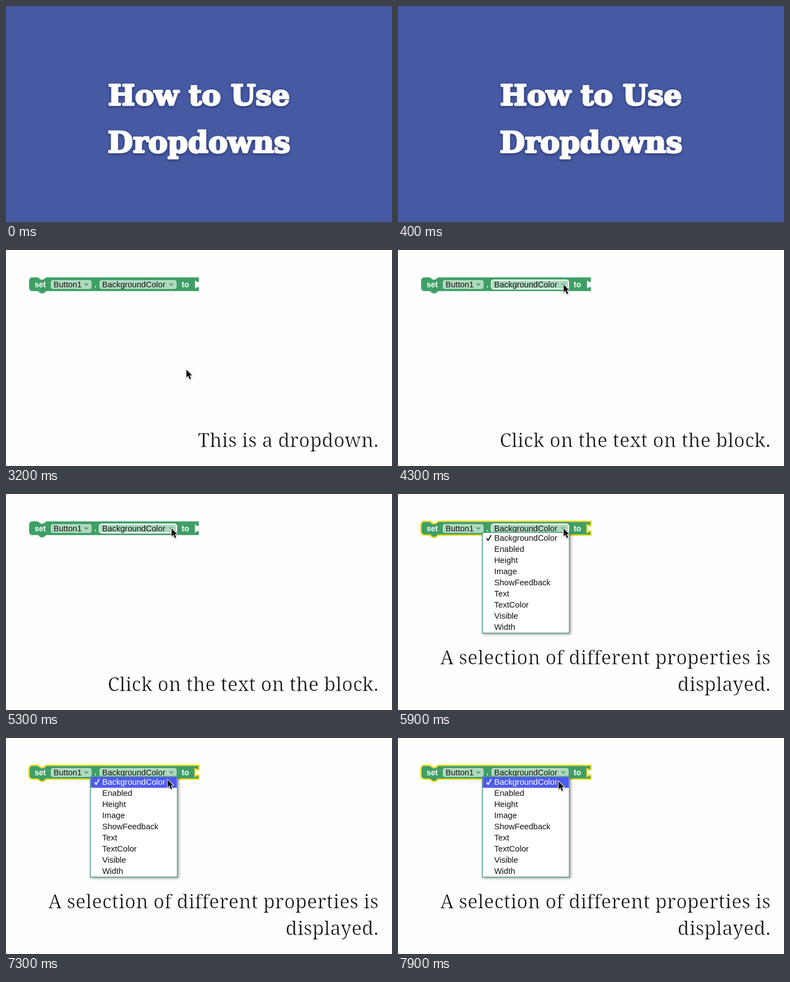
Animation of 690 by 388 pixels, one loop 8000 ms. Source, as an HTML page with a canvas:

```html
<!DOCTYPE html>
<html lang="en">
<head>
<meta charset="utf-8">
<title>How to Use Dropdowns</title>
<style>
  html, body { margin: 0; width: 100%; height: 100%; overflow: hidden; background: #fefefe; }
  canvas { display: block; width: 690px; height: 388px; }
</style>
</head>
<body>
<canvas id="stage" width="690" height="388"></canvas>
<script>
const ctx = document.getElementById('stage').getContext('2d');
const LOOP = 8000;
const SANS = '"Liberation Sans", Arial, sans-serif';
const ITEMS = ['BackgroundColor', 'Enabled', 'Height', 'Image', 'ShowFeedback',
               'Text', 'TextColor', 'Visible', 'Width'];

// Pointer tip: [time, x, y]
const POINTER = [
  [1800, 366, 194], [2500, 322.5, 215], [3400, 322.5, 215], [3800, 301, 115],
  [3900, 301, 115], [4200, 296, 62], [7050, 296, 62], [7400, 287, 78]
];

const CAPTIONS = [
  [5800, ['A selection of different properties is', 'displayed.']],
  [4000, ['Click on the text on the block.']],
  [1800, ['This is a dropdown.']]
];

const ease = u => u * u * (3 - 2 * u);

function pointerAt(t) {
  const next = POINTER.findIndex(k => k[0] > t);
  if (next < 0) return POINTER[POINTER.length - 1].slice(1);
  const [t0, x0, y0] = POINTER[next - 1], [t1, x1, y1] = POINTER[next];
  const u = ease((t - t0) / (t1 - t0));
  return [x0 + (x1 - x0) * u, y0 + (y1 - y0) * u];
}

function text(str, x, y, font, color, align = 'left') {
  ctx.font = font;
  ctx.fillStyle = color;
  ctx.textAlign = align;
  ctx.fillText(str, x, y);
}

function polygon(points) {
  ctx.beginPath();
  points.forEach(([x, y]) => ctx.lineTo(x, y));
  ctx.closePath();
}

function drawTitleLine(line, y, size) {
  ctx.save();
  ctx.shadowColor = 'rgba(10, 15, 50, 0.5)';
  ctx.shadowBlur = 4;
  ctx.shadowOffsetY = 2;
  // A round outline softens and thickens the slabs.
  ctx.strokeStyle = '#fff';
  ctx.lineJoin = 'round';
  ctx.lineWidth = 3;
  ctx.textAlign = 'center';
  ctx.font = `bold ${size}px "DejaVu Serif", serif`;
  ctx.strokeText(line, 345, y);
  ctx.shadowColor = 'transparent';
  text(line, 345, y, ctx.font, '#fff', 'center');
  ctx.restore();
}

function drawTitle() {
  ctx.fillStyle = '#4659a3';
  ctx.fillRect(0, 0, 690, 388);
  drawTitleLine('How to Use', 177.5, 51);
  drawTitleLine('Dropdowns', 262.5, 52);
}

function drawCaption(lines) {
  ctx.save();
  ctx.letterSpacing = '0.25px';
  lines.forEach((line, i) => {
    const y = 354 - 48 * (lines.length - 1 - i);
    text(line, 666, y, '300 34px "Noto Serif", serif', '#111', 'right');
    // A hairline in the page colour slims the strokes.
    ctx.strokeStyle = '#fefefe';
    ctx.lineWidth = 0.7;
    ctx.strokeText(line, 666, y);
  });
  ctx.restore();
}

function blockPath() {
  ctx.beginPath();
  ctx.moveTo(48, 49);
  ctx.lineTo(57, 49);
  ctx.lineTo(62, 53);
  ctx.lineTo(67, 53);
  ctx.lineTo(72, 49);
  ctx.lineTo(345, 49);
  ctx.lineTo(345, 56);
  ctx.lineTo(343, 58);
  ctx.lineTo(338, 55);
  ctx.lineTo(338, 69);
  ctx.lineTo(343, 66);
  ctx.lineTo(345, 68);
  ctx.lineTo(345, 74);
  ctx.lineTo(72, 74);
  ctx.lineTo(67, 78);
  ctx.lineTo(62, 78);
  ctx.lineTo(57, 74);
  ctx.lineTo(48, 74);
  ctx.quadraticCurveTo(41, 74, 41, 67);
  ctx.lineTo(41, 56);
  ctx.quadraticCurveTo(41, 49, 48, 49);
  ctx.closePath();
}

function drawField(label, x, width, hovered) {
  ctx.beginPath();
  ctx.roundRect(x, 54, width, 16, 4);
  ctx.fillStyle = '#afd9bf';
  ctx.fill();
  if (hovered) {
    ctx.strokeStyle = '#f4fbf6';
    ctx.lineWidth = 2;
    ctx.stroke();
  }
  text(label, x + 5, 66.5, '14.6px ' + SANS, '#111');
  const right = x + width;
  polygon([[right - 14, 60], [right - 5, 60], [right - 9.5, 65]]);
  ctx.fillStyle = '#64a882';
  ctx.fill();
}

function drawBlock(selected, hovered) {
  ctx.lineJoin = 'round';
  blockPath();
  ctx.fillStyle = '#3f9f66';
  ctx.fill();
  ctx.save();
  ctx.clip();
  ctx.strokeStyle = '#6ab488';
  ctx.lineWidth = 2;
  ctx.stroke();
  ctx.restore();
  if (selected) {
    ctx.strokeStyle = '#f0dc28';
    ctx.lineWidth = 2.6;
    ctx.stroke();
  }
  const bold = 'bold 14px ' + SANS;
  text('set', 51, 66.5, bold, '#fff');
  text('.', 158, 66.5, bold, '#fff');
  text('to', 314, 66.5, bold, '#fff');
  drawField('Button1', 80, 73, false);
  drawField('BackgroundColor', 167, 138, hovered);
}

function drawMenu(highlighted) {
  ctx.save();
  ctx.shadowColor = 'rgba(0, 0, 0, 0.4)';
  ctx.shadowBlur = 5;
  ctx.shadowOffsetX = ctx.shadowOffsetY = 2;
  ctx.fillStyle = '#fff';
  ctx.fillRect(150, 69, 157, 181);
  ctx.restore();
  ctx.strokeStyle = '#58a384';
  ctx.lineWidth = 1.5;
  ctx.strokeRect(150.75, 69.25, 155.5, 180.5);
  if (highlighted) {
    ctx.fillStyle = '#4e5bf0';
    ctx.fillRect(151.5, 70, 154, 19.5);
  }
  ITEMS.forEach((item, i) => {
    const color = highlighted && i === 0 ? '#fff' : '#111';
    text(item, 172, 84.3 + 20 * i, '14.6px ' + SANS, color);
  });
  ctx.beginPath();
  ctx.moveTo(158.5, 79.5);
  ctx.lineTo(161, 83.5);
  ctx.lineTo(166.5, 74);
  ctx.strokeStyle = highlighted ? '#fff' : '#111';
  ctx.lineWidth = 1.8;
  ctx.stroke();
}

function drawPointer([x, y]) {
  ctx.save();
  ctx.translate(x, y);
  polygon([[0, 0], [0, 14], [3.2, 11], [5.8, 17], [8.2, 16], [5.7, 10.2], [10, 10]]);
  ctx.shadowColor = 'rgba(0, 0, 0, 0.35)';
  ctx.shadowBlur = 2;
  ctx.shadowOffsetY = 1;
  ctx.strokeStyle = '#fff';
  ctx.lineWidth = 2;
  ctx.stroke();
  ctx.shadowColor = 'transparent';
  ctx.fillStyle = '#080808';
  ctx.fill();
  ctx.restore();
}

function draw(t) {
  if (t < 1800) return drawTitle();
  const pointer = pointerAt(t);
  const [x, y] = pointer;
  const open = t >= 5800;
  const overField = x > 167 && x < 305 && y > 54 && y < 70;
  ctx.fillStyle = '#fefefe';
  ctx.fillRect(0, 0, 690, 388);
  drawCaption(CAPTIONS.find(([start]) => t >= start)[1]);
  drawBlock(open, overField);
  if (open) drawMenu(y >= 70);
  drawPointer(pointer);
}

let start;
function tick(now) {
  start ??= now;
  draw((now - start) % LOOP);
  requestAnimationFrame(tick);
}
requestAnimationFrame(tick);
</script>
</body>
</html>
```
